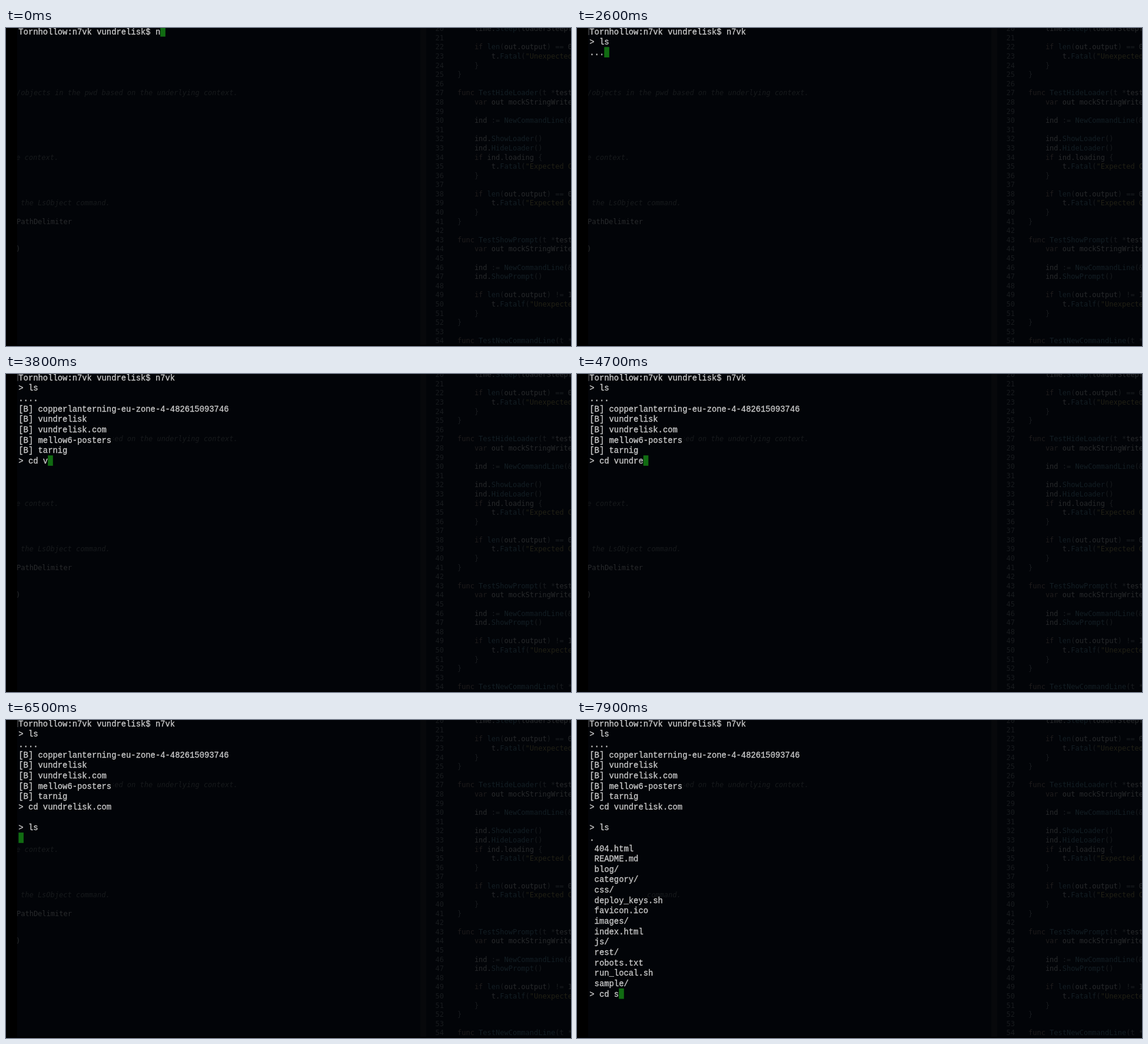
An HTML page with a canvas for the animation above (8000 ms loop, 960x540 px).

```html
<!DOCTYPE html>
<html lang="en">
<head>
<meta charset="utf-8">
<title>Terminal session</title>
<style>
  html, body { margin: 0; width: 100%; height: 100%; overflow: hidden; background: #000; }
  canvas { display: block; width: 960px; height: 540px; }
</style>
</head>
<body>
<canvas id="stage" width="960" height="540"></canvas>
<script>
const ctx = document.getElementById('stage').getContext('2d');
const LOOP = 8000;
const CODE_FONT = '12px "DejaVu Sans Mono", monospace';
const TERM_FONT = '13.85px "Liberation Mono", monospace';
const TERM = { x: 21.3, y: 10.7, col: 8.31, row: 17.65 };
const LISTED = 2800, FILES = 6700;

const COLOR = {
  back: '#020408', band: '#07080b', number: '#181b1e', plain: '#282a2c',
  dim: '#191c1f', call: '#131e24', key: '#1f1c1c', string: '#212015',
  note: '#171a1c', text: '#c8c8c8', cursor: '#116c12'
};

// Editor lines 20 to 54, seen through the terminal
const CODE = `    time.Sleep(loaderSleepTime)

    if len(out.output) == 0 {
        t.Fatal("Unexpected output
    }
}

func TestHideLoader(t *testing.T) {
    var out mockStringWriter

    ind := NewCommandLine(&out)

    ind.ShowLoader()
    ind.HideLoader()
    if ind.loading {
        t.Fatal("Expected CommandLine
    }

    if len(out.output) == 0 {
        t.Fatal("Expected CommandLine
    }
}

func TestShowPrompt(t *testing.T) {
    var out mockStringWriter

    ind := NewCommandLine(&out)
    ind.ShowPrompt()

    if len(out.output) != 1 {
        t.Fatalf("Unexpected output
    }
}

func TestNewCommandLine(t *testing.T) {`.split('\n');

// Left pane: line, x, text, comment?, [time, x] from which the terminal covers it
const NOTES = [
  [27, 18, '/objects in the pwd based on the underlying context.', true, [LISTED, 182]],
  [34, 17, 'e context.', true, [FILES, 100]],
  [39, 25, 'the LsObject command.', true, [FILES, 117]],
  [41, 18, 'PathDelimiter', false, [FILES, 115]],
  [44, 17, ')', false, [FILES, 30]]
];

const BUCKETS = ['copperlanterning-eu-zone-4-482615093746', 'vundrelisk',
  'vundrelisk.com', 'mellow6-posters', 'tarnig'];
const FILE_NAMES = ['404.html', 'README.md', 'blog/', 'category/', 'css/',
  'deploy_keys.sh', 'favicon.ico', 'images/', 'index.html', 'js/', 'rest/',
  'robots.txt', 'run_local.sh', 'sample/'];

const list = (names, prefix) => names.map(n => '\n' + prefix + n).join('') + '\n> ';

// What is added to the terminal, and when
const EVENTS = [
  [0, 'Tornhollow:n7vk vundrelisk$ n'], [100, '7'], [900, 'v'], [1000, 'k'], [1100, '\n> '],
  [1900, 'l'], [2100, 's'], [2300, '\n'],
  [2400, '.'], [2500, '.'], [2600, '.'], [2700, '.'],
  [LISTED, list(BUCKETS, '[B] ')],
  [3400, 'c'], [3500, 'd'], [3600, ' '], [3800, 'v'], [3900, 'u'], [4000, 'n'], [4300, 'd'],
  [4500, 'r'], [4600, 'e'], [4800, 'l'], [4900, 'i'], [5000, 's'], [5100, 'k'], [5300, '.'],
  [5400, 'c'], [5500, 'o'], [5600, 'm'], [5900, '\n'], [6000, '\n> '],
  [6200, 'l'], [6300, 's'], [6500, '\n'], [6600, '.'],
  [FILES, list(FILE_NAMES, ' ')],
  [7400, 'c'], [7500, 'd'], [7600, ' '], [7800, 's']
];

const lineY = n => 5.3 + 15.588 * (n - 20);

function write(text, x, y, color) {
  ctx.fillStyle = color;
  ctx.fillText(text, x, y);
}

// Terminal type is slightly heavier than the regular weight
function writeHeavy(text, x, y, color) {
  write(text, x, y, color);
  ctx.strokeStyle = color;
  ctx.lineWidth = 0.35;
  ctx.strokeText(text, x, y);
}

function box(x, y, w, h, color) {
  ctx.fillStyle = color;
  ctx.fillRect(x, y, w, h);
}

function tokenColor(token, next) {
  if (token[0] === '"') return COLOR.string;
  if (/^(func|if|var)$/.test(token)) return COLOR.key;
  if (/^\w/.test(token)) return next === '(' ? COLOR.call : COLOR.plain;
  return token === '.' ? COLOR.plain : COLOR.dim;
}

function drawCode() {
  ctx.font = CODE_FONT;
  const step = ctx.measureText('0').width;
  CODE.forEach((line, i) => {
    const y = lineY(20 + i);
    write(20 + i, 729.5, y, COLOR.number);
    for (const m of line.matchAll(/"[^"]*|\w+|[^\w\s]/g)) {
      const next = line[m.index + m[0].length];
      const color = line.startsWith('func') && m[0] === 't' ? COLOR.dim : tokenColor(m[0], next);
      write(m[0], 767 + m.index * step, y, color);
    }
  });
}

function drawNotes(t) {
  for (const [line, x, text, comment, [when, edge]] of NOTES) {
    const left = t >= when ? edge : 19;
    const y = lineY(line);
    ctx.save();
    ctx.beginPath();
    ctx.rect(left, y - 14, 700 - left, 20);
    ctx.clip();
    ctx.font = (comment ? 'italic ' : '') + CODE_FONT;
    write(text, x, y, comment ? COLOR.note : COLOR.plain);
    ctx.restore();
  }
}

function drawTerminal(t) {
  const rows = EVENTS.filter(e => e[0] <= t).map(e => e[1]).join('').split('\n');
  const last = rows.length - 1;
  ctx.font = TERM_FONT;
  rows.forEach((row, i) => writeHeavy(row, TERM.x, TERM.y + i * TERM.row, COLOR.text));
  box(TERM.x + rows[last].length * TERM.col, last * TERM.row - 3, 8.6, TERM.row, COLOR.cursor);
  if (t >= 1100) box(19.5, 0, 1, 12, '#666');
}

function draw(t) {
  box(0, 0, 960, 540, '#000');
  box(19, 0, 941, 538, COLOR.back);
  box(704, 0, 10, 538, COLOR.band);
  drawCode();
  drawNotes(t);
  drawTerminal(t);
}

const start = performance.now();
function tick() {
  draw((performance.now() - start) % LOOP);
  requestAnimationFrame(tick);
}
tick();
</script>
</body>
</html>
```
